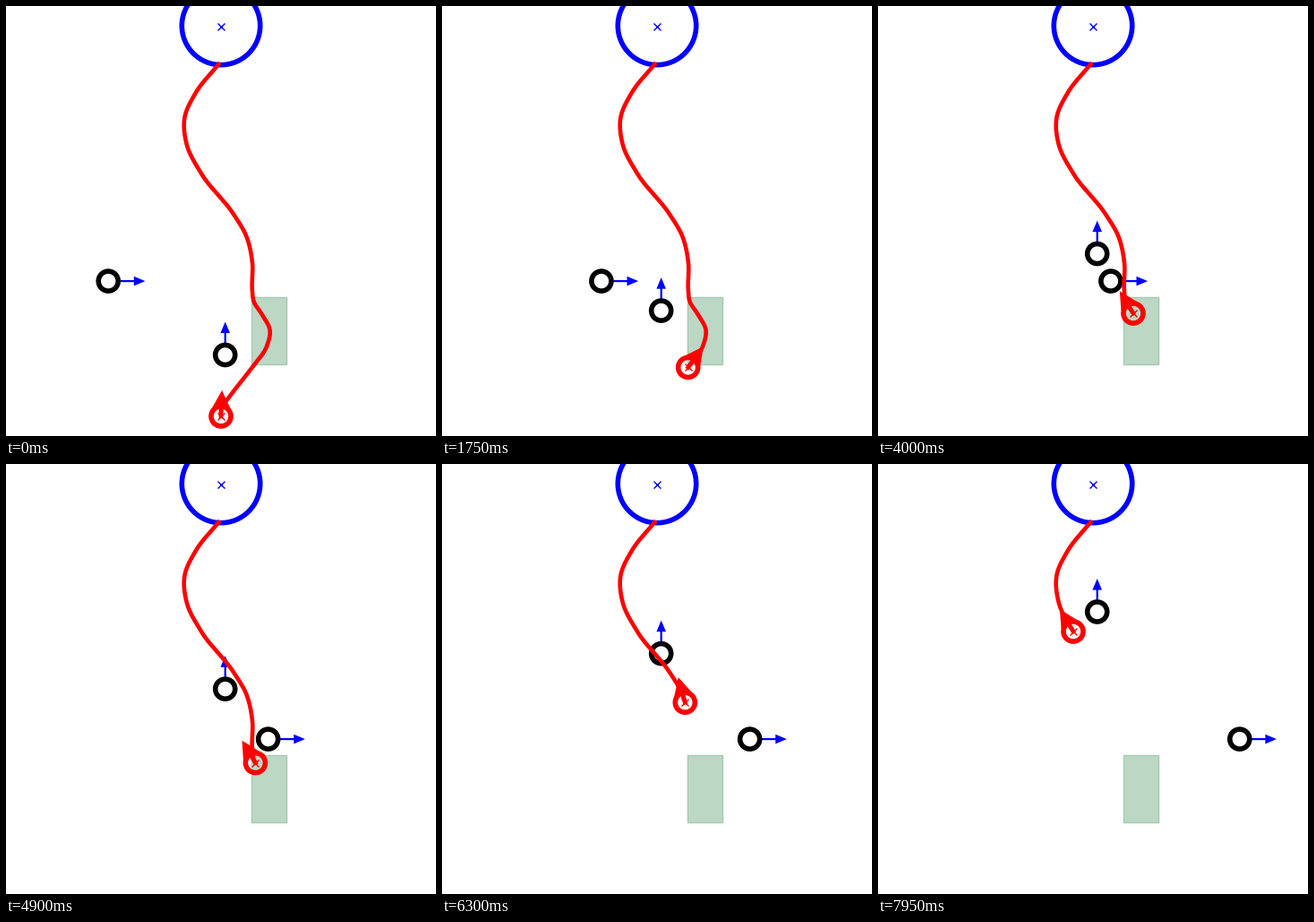
A matplotlib script that plays this animation: 480 by 480 pixels, repeating every 8000 ms.

```python
import numpy as np
import matplotlib.pyplot as plt
from matplotlib.animation import FuncAnimation
from matplotlib.patches import Circle, Polygon, Rectangle

SIZE, DPI = 480, 100
FRAMES, STEP = 160, 50
PX = 72 / DPI  # points per pixel


def smooth_curve(points, count=1200):
    """Cubic Hermite curve through the points: distances and positions."""
    pts = np.array(points, float)
    knots = np.r_[0, np.cumsum(np.hypot(*np.diff(pts, axis=0).T))]
    slope = np.gradient(pts, knots, axis=0)
    t = np.linspace(0, knots[-1], count)
    i = np.clip(np.searchsorted(knots, t, side="right") - 1, 0, len(knots) - 2)
    h = (knots[i + 1] - knots[i])[:, None]
    u = (t - knots[i])[:, None] / h
    xy = ((1 + 2 * u) * (1 - u) ** 2 * pts[i] + u * (1 - u) ** 2 * h * slope[i]
          + u * u * (3 - 2 * u) * pts[i + 1] + u * u * (u - 1) * h * slope[i + 1])
    dist = np.r_[0, np.cumsum(np.hypot(*np.diff(xy, axis=0).T))]
    return dist, xy


# Planned route from the robot to the goal
dist, route = smooth_curve([
    (240, 458), (240.4, 449), (249, 436.7), (275, 403), (291, 380),
    (294.6, 362), (285.5, 344), (276.3, 329), (274.9, 318), (275, 287),
    (268.3, 257), (254.3, 232.8), (218, 187), (201.7, 154.5), (199.3, 125),
    (211.7, 97), (237.3, 65)])
heading = np.gradient(route, dist, axis=0)

# Speed up, cruise, creep round the corner, then speed up again
speed = np.interp(np.arange(FRAMES), [0, 18, 47, 68, 93, 110, FRAMES - 1],
                  [0.13, 2.5, 2.5, 0.55, 0.55, 2.75, 3.0])
travel = np.r_[0, np.cumsum((speed[1:] + speed[:-1]) / 2)]
travel *= np.interp(-187, -route[:, 1], dist) / travel[-1]


def along(s, curve):
    return np.array([np.interp(s, dist, c) for c in curve.T])


def arrow_points(start, way, length, head, half, shaft):
    side = np.array([-way[1], way[0]])
    tip = start + way * length
    neck = tip - way * head
    return [start + side * shaft, neck + side * shaft, neck + side * half, tip,
            neck - side * half, neck - side * shaft, start - side * shaft]


fig = plt.figure(figsize=(SIZE / DPI, SIZE / DPI), dpi=DPI, facecolor="white")
ax = fig.add_axes([0, 0, 1, 1])
ax.set(xlim=(0, SIZE), ylim=(SIZE, 0))
ax.axis("off")


def ring(pos, radius, color, z, face="none"):
    return ax.add_patch(Circle(pos, radius, fc=face, ec=color,
                               lw=5.6 * PX, zorder=z))


def arrow(color, z):
    return ax.add_patch(Polygon(np.zeros((3, 2)), fc=color, ec="none", zorder=z))


def cross(pos, color, z):
    return ax.plot(*pos, "x", color=color, ms=6, mew=1, zorder=z)[0]


ax.add_patch(Rectangle((274, 325), 39, 75, fc="#bdd7c5", ec="#a3cbb0",
                       lw=1.39 * PX, zorder=1))
ring((240, 22), 43.7, "blue", 2)
cross((240.4, 22.5), "blue", 2)


class Walker:
    """Obstacle moving at constant speed, with an arrow for its velocity."""

    def __init__(self, start, way, speed, reach, z):
        self.start, self.way = np.array(start), np.array(way)
        self.speed, self.reach = speed, reach
        self.arrow = arrow("blue", z)
        self.ring = ring(start, 11, "black", z + 0.1, "white")

    def move(self, frame):
        pos = self.start + self.way * self.speed * frame
        self.ring.center = pos
        self.arrow.set_xy(arrow_points(pos, self.way, self.reach, 12.6, 5.3, 1.1))


walkers = [Walker((244.7, 389.5), (0.0, -1.0), 1.412, 37, 3),
           Walker((114.2, 307.1), (1.0, 0.0), 1.821, 41.2, 4)]

trail, = ax.plot([], [], color="red", lw=4.6 * PX, zorder=6)
body = ring((0, 0), 11, "red", 7)
nose = arrow("red", 7.1)
mark = cross((0, 0), "red", 7.2)


def draw(frame):
    for w in walkers:
        w.move(frame)
    s = travel[frame]
    pos, way = along(s, route), along(s, heading)
    left = np.vstack([pos, route[dist > s]])
    trail.set_data(left[:, 0], left[:, 1])
    body.center = pos
    nose.set_xy(arrow_points(pos, way / np.hypot(*way), 29, 19.5, 10, 2.3))
    mark.set_data([pos[0]], [pos[1]])
    return [trail, body, nose, mark]


anim = FuncAnimation(fig, draw, frames=FRAMES, interval=STEP,
                     init_func=lambda: draw(0), repeat=True, repeat_delay=0)
plt.show()
```
